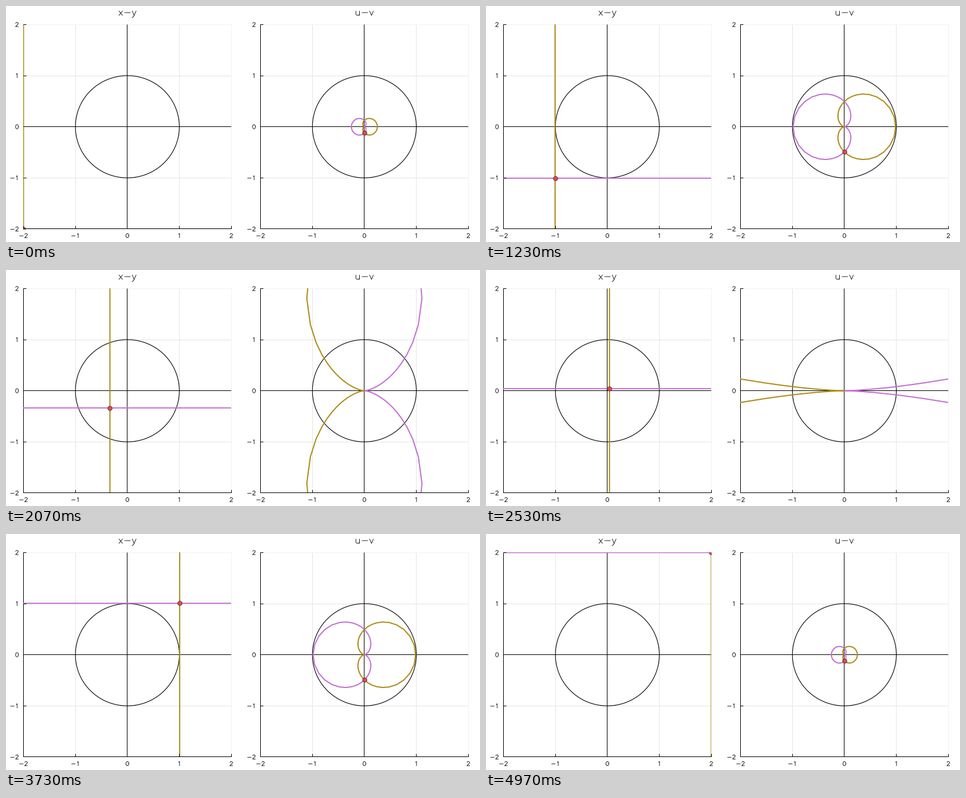
A matplotlib script that plays this animation: 800 by 400 pixels, repeating every 5.01 s.

```python
import numpy as np
import matplotlib.pyplot as plt
from matplotlib.animation import FuncAnimation

W, H, DPI = 800, 400, 100
PX = 72 / DPI                      # one pixel in points
STEPS, TICKS, TICK_MS = 150, 501, 10
TOP, BOTTOM, SIDE = 31.4, 377.9, 350.8
PURPLE, GOLD, RED = "#c271d2", "#ac8d18", "#ff3844"


def arc(cx, cy, rx, ry, start=0, end=360):
    a = np.radians(np.linspace(start, end, 17))
    return list(zip(cx + rx * np.cos(a), cy + ry * np.sin(a)))


def line(*points):
    return list(points)


# Single-stroke letters: advance width, then strokes (cap height 21)
GLYPHS = {
    "0": (20, [arc(10, 10.5, 7, 10.5)]),
    "1": (20, [line((6, 17), (11, 21), (11, 0))]),
    "2": (20, [arc(10, 15.5, 6, 5.5, 175, -35) + line((3, 0), (17, 0))]),
    "-": (26, [line((4, 9), (22, 9))]),
    "x": (17, [line((3, 14), (14, 0)), line((14, 14), (3, 0))]),
    "y": (16, [line((2, 14), (8, 0)), line((14, 14), (6, -4), (1, -7))]),
    "u": (19, [line((4, 14)) + arc(9.5, 5, 5.5, 5, 180, 360),
               line((15, 14), (15, 0))]),
    "v": (16, [line((2, 14), (8, 0), (14, 14))]),
}

fig = plt.figure(figsize=(W / DPI, H / DPI), dpi=DPI, facecolor="white")


def pixel_layer(z):
    ax = fig.add_axes([0, 0, 1, 1], zorder=z)
    ax.set(xlim=(0, W), ylim=(H, 0))
    ax.axis("off")
    return ax


back, front = pixel_layer(0), pixel_layer(2)


def rule(ax, x0, y0, x1, y1, color="black"):
    """Crisp one-pixel horizontal or vertical line."""
    if x0 == x1:
        x0 = x1 = np.floor(x0) + 0.5
    else:
        y0 = y1 = np.floor(y0) + 0.5
    ax.plot([x0, x1], [y0, y1], color=color, lw=PX,
            solid_capstyle="butt", snap=False)


def write(text, x, middle, scale, align, cap=21):
    """Draw stroke text; align is the fraction of its width left of x."""
    x -= align * scale * sum(GLYPHS[c][0] for c in text)
    base = middle + scale * cap / 2
    for c in text:
        advance, strokes = GLYPHS[c]
        for stroke in strokes:
            p = np.array(stroke) * scale
            front.plot(x + p[:, 0], base - p[:, 1], color="black",
                       lw=0.85 * PX, solid_capstyle="round", snap=False)
        x += advance * scale


def make_panel(left, title):
    right, cx, cy = left + SIDE, left + SIDE / 2, (TOP + BOTTOM) / 2
    ax = fig.add_axes([left / W, 1 - BOTTOM / H, SIDE / W, (BOTTOM - TOP) / H],
                      zorder=1)
    ax.set(xlim=(-2, 2), ylim=(-2, 2))
    ax.axis("off")

    for k in range(-2, 3):
        x, y = cx + SIDE * k / 4, cy - (BOTTOM - TOP) * k / 4
        grid = "#f2f2f2" if k == 2 else "#e5e5e5"
        rule(back, x, TOP, x, BOTTOM, grid)
        rule(back, left, y, right, y, grid)
        rule(front, x, BOTTOM - 5, x, BOTTOM)
        rule(front, left, y, left + 5, y)
        write(str(k), x, 389.2, 0.34, 0.5)
        write(str(k), left - 7.5, y, 0.34, 1)
    rule(back, left, TOP, left, BOTTOM)
    rule(back, left, cy, right, cy)
    rule(back, cx, TOP, cx, BOTTOM)
    rule(front, left, BOTTOM, right, BOTTOM)
    write(title, cx, 12.2, 0.535, 0.5, cap=14)

    a = np.linspace(0, 2 * np.pi, 201)
    ax.plot(np.cos(a), np.sin(a), color="black", lw=1.1 * PX)

    curves = [ax.plot([], [], color=c, lw=2 * PX, snap=False)[0]
              for c in (PURPLE, GOLD)]
    dot, = ax.plot([], [], "o", ms=7.2 * PX, mfc=RED, mec="#333333",
                   mew=PX, alpha=0.9, snap=False, zorder=5)
    return curves + [dot]


xy = make_panel(29.45, "x-y")
uv = make_panel(429.45, "u-v")
span = np.arange(-100, 101) / 10


def update(tick):
    # The picture advances 30 times a second on a 10 ms clock
    step = min((3 * tick + 1) // 10, STEPS - 1)
    c = -2 + 4 * step / (STEPS - 1)
    shapes = (span + 1j * c, c + 1j * span, np.array([c + 1j * c]))
    for z, plain, mapped in zip(shapes, xy, uv):
        w = 1 / z ** 2
        plain.set_data(z.real, z.imag)
        mapped.set_data(w.real, w.imag)
    return xy + uv


anim = FuncAnimation(fig, update, frames=TICKS, interval=TICK_MS,
                     repeat=True, repeat_delay=0, blit=False)
plt.show()
```
